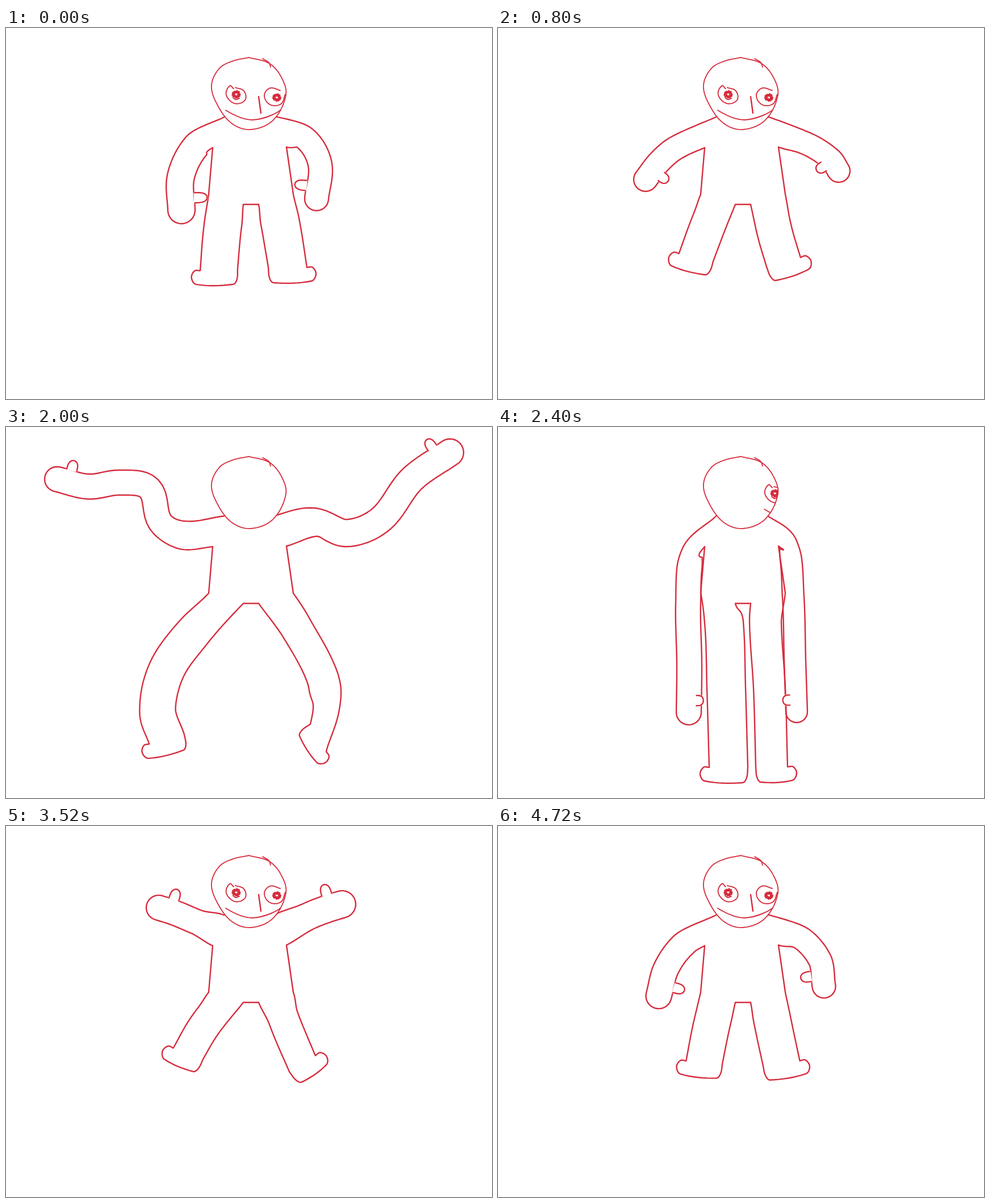
An HTML page with a canvas that plays this animation: 856 by 654 pixels, repeating every 4800 ms.

```html
<!DOCTYPE html>
<html lang="en">
<head>
<meta charset="utf-8">
<title>Dancing figure</title>
<style>
html, body { margin: 0; width: 100%; height: 100%; overflow: hidden; background: #fff; }
canvas { display: block; }
</style>
</head>
<body>
<canvas id="stage" width="856" height="654"></canvas>
<script>
const ctx = document.getElementById('stage').getContext('2d');
const INK = '#d62c3d', STEP = 80, STEPS = 60, N = 48;
const SIDES = [-1, 1];
const SHOULDERS = [[374, 185], [484, 184]], HIPS = [[388, 302], [475, 302]];

const lerp = (a, b, t) => a + (b - a) * t;
const lerpPoint = (a, b, t) => [lerp(a[0], b[0], t), lerp(a[1], b[1], t)];
const add = (p, v, k = 1) => [p[0] + v[0] * k, p[1] + v[1] * k];
const scale = (v, k) => [v[0] * k, v[1] * k];
const ramp = t => { t = Math.min(Math.max(t, 0), 1); return t * t * (3 - 2 * t); };
const points = text => text.split(' ').map(p => p.split(',').map(Number));
const unit = (a, b) => {
  const d = Math.hypot(b[0] - a[0], b[1] - a[1]) || 1;
  return [(b[0] - a[0]) / d, (b[1] - a[1]) / d];
};

// Unit direction of a polyline at point i.
const heading = (p, i) => unit(p[Math.max(i - 1, 0)], p[Math.min(i + 1, p.length - 1)]);

// Smooth curve through a few points, returned as n + 1 samples.
function smooth(p, n) {
  const last = p.length - 1, dirs = p.map((_, i) => heading(p, i));
  return Array.from({ length: n + 1 }, (_, j) => {
    const u = j / n * last, i = Math.min(Math.floor(u), last - 1), t = u - i;
    const a = p[i], b = p[i + 1], k = Math.hypot(b[0] - a[0], b[1] - a[1]) * t * (1 - t);
    const c = lerpPoint(a, b, ramp(t));
    return add(add(c, dirs[i], k * (1 - t)), dirs[i + 1], -k * t);
  });
}

// A limb is a centre line with a half width r; turn is the thumb side or the foot tilt.
const limb = (r, turn, text) => ({ r, turn, text });
const build = (limbs, roots) => limbs.map(({ r, turn, text }, i) =>
  ({ r, turn, spine: smooth([roots[i], ...points(text)], N) }));
const pose = (armL, armR, legL, legR) =>
  ({ arms: build([armL, armR], SHOULDERS), legs: build([legL, legR], HIPS) });

const down = pose(
  limb(24, 1, '335,208 308,262 309,321'), limb(21, 0.85, '526,194 553,240 547,301'),
  limb(33, -3, '380,365 375,426'), limb(34, 0, '486,360 496,422'));
const out = pose(
  limb(21, 0.45, '314,211 284,236 260,267'), limb(20, 0.45, '546,205 586,231 600,252'),
  limb(31, 12, '367,355 349,404'), limb(31, 16, '488,362 503,413'));
const up = pose(
  limb(22, -0.75, '333,168 297,153 269,144'), limb(24, -0.75, '535,158 566,146 592,138'),
  limb(28, 20, '347,356 321,401'), limb(27, 32, '496,358 522,419'));
const wide = pose(
  limb(25, 0.1, '330,153 250,133 185,138'), limb(19, -0.8, '545,147 615,131 692,121'),
  limb(30, 36, '333,374 286,432'), limb(30, 51, '520,381 569,451'));
const wave = pose(
  limb(22, -0.65, '312,191 272,168 252,108 200,98 145,105 90,92'),
  limb(24, -0.7, '545,168 600,187 660,163 715,92 782,45'),
  limb(32, -16, '330,362 283,428 267,500 283,550'), limb(28, -60, '510,352 556,438 563,492 550,548'));
const tall = pose(
  limb(22, 0.3, '343,220 335,310 337,420 336,503'), limb(19, 0.3, '510,205 520,300 523,410 526,502'),
  limb(34, 0, '398,345 402,460 406,600'), limb(28, 0, '471,345 478,460 482,599'));

// Swing a point about a shoulder: angle and reach change together.
function swing(a, b, t, [cx, cy]) {
  const a0 = Math.atan2(a[1] - cy, a[0] - cx), a1 = Math.atan2(b[1] - cy, b[0] - cx);
  const turn = Math.atan2(Math.sin(a1 - a0), Math.cos(a1 - a0));
  const r = lerp(Math.hypot(a[0] - cx, a[1] - cy), Math.hypot(b[0] - cx, b[1] - cy), t);
  return [cx + r * Math.cos(a0 + turn * t), cy + r * Math.sin(a0 + turn * t)];
}

function mix(a, b, t) {
  const blend = (key, move) => a[key].map((m, i) => {
    const n = b[key][i];
    return {
      r: lerp(m.r, n.r, t),
      turn: lerp(m.turn, n.turn, t),
      spine: m.spine.map((p, j) => move(p, n.spine[j], t, SHOULDERS[i]))
    };
  });
  return { arms: blend('arms', swing), legs: blend('legs', lerpPoint) };
}

function raise(a, deg) {
  const arms = a.arms.map((arm, i) => {
    const w = -SIDES[i] * deg * Math.PI / 180, [cx, cy] = SHOULDERS[i];
    const spine = arm.spine.map(([x, y]) => [
      cx + (x - cx) * Math.cos(w) - (y - cy) * Math.sin(w),
      cy + (x - cx) * Math.sin(w) + (y - cy) * Math.cos(w)]);
    return { ...arm, spine };
  });
  return { ...a, arms };
}

const flap = [down, mix(down, out, 0.45), out, mix(out, up, 0.5), up, raise(up, 6), raise(up, 12)];

// from step, to step, poses, easing power
const dance = [
  [14, 17, out, wide, 1],
  [17, 25, wide, wave, 1],
  [25, 30, wave, tall, 1.4],
  [30, 36, tall, down, 1.6]
];

function poseAt(step) {
  const part = dance.find(([from, to]) => step > from && step <= to);
  if (part) {
    const [from, to, a, b, power] = part;
    return mix(a, b, ((step - from) / (to - from)) ** power);
  }
  const phase = step % 12;
  return flap[Math.min(phase, 12 - phase)];
}

function faceShift(step) {
  if (step <= 14 || step >= 36) return 0;
  return step <= 25 ? -18.3 * (step - 14) : 13.7 * (36 - step);
}

// Unit vector from the centre line towards the body's middle.
function inward(spine, i, side) {
  const [dx, dy] = heading(spine, i);
  return [-side * dy, side * dx];
}

// One edge of a limb; its root and, if given, its end keep fixed offsets.
function edge({ spine, r }, side, sign, root, end) {
  return spine.map((p, i) => {
    const u = i / N, normal = scale(inward(spine, i, side), sign * r);
    const v = lerpPoint(root, normal, ramp(u / 0.33));
    return add(p, end ? lerpPoint(v, end, ramp((u - 0.6) / 0.4)) : v);
  });
}

function armLine(arm, side) {
  const tip = arm.spine[N], d = heading(arm.spine, N), n = inward(arm.spine, N, side);
  const cap = Array.from({ length: 17 }, (_, i) => {
    const a = Math.PI * i / 16;
    return add(add(tip, n, -arm.r * Math.cos(a)), d, arm.r * Math.sin(a));
  });
  return [
    ...edge(arm, side, -1, [-10 * side, -28]), ...cap,
    ...edge(arm, side, 1, [10 * side, 26]).reverse()
  ];
}

function thumbLine({ spine, r, turn }, side) {
  const d = heading(spine, N), n = inward(spine, N, side), sign = turn < 0 ? -1 : 1;
  const reach = Math.min(Math.max(2 * turn, -1), 1) * r, len = sign * (8 + 14 * Math.abs(turn));
  const base = add(add(spine[N], d, -21), n, reach);
  return Array.from({ length: 25 }, (_, i) => {
    const a = Math.PI * i / 24;
    return add(add(base, d, -9 * Math.cos(a)), n, len * Math.abs(Math.sin(a)) ** 0.6);
  });
}

// Armpit, outer leg, foot, inner leg, crotch.
function legLine(leg, side) {
  const { r, spine } = leg, a = leg.turn * Math.PI / 180, ankle = spine[N];
  const toe = [side * Math.cos(a), -Math.sin(a)], sole = [side * Math.sin(a), Math.cos(a)];
  const at = (x, y) => add(add(ankle, toe, x), sole, y);
  const foot = smooth([
    at(r, 0), at(r + 10, 0), at(r + 16, 12), at(r + 8, 24),
    at(9 - r, 27), at(2 - r, 18), at(-r, 0)], 48);
  const shoulder = SHOULDERS[side < 0 ? 0 : 1];
  return [
    add(shoulder, [10 * side, 26]),
    ...edge(leg, side, -1, [31 * side, -9], scale(toe, r)), ...foot,
    ...edge(leg, side, 1, [-30 * side, 9], scale(toe, -r)).reverse()
  ];
}

function trace(line) {
  const path = new Path2D();
  line.forEach(([x, y]) => path.lineTo(x, y));
  return path;
}

const curve = text => trace(smooth(points(text), 96));

function stroke(path, width, color = INK) {
  ctx.lineWidth = width;
  ctx.strokeStyle = color;
  ctx.stroke(path);
}

function fill(path) {
  ctx.fillStyle = '#fff';
  ctx.fill(path);
}

const scribble = (cx, cy) => trace(Array.from({ length: 50 }, (_, i) => {
  const r = 4.6 + 2.2 * Math.sin(i * 1.3);
  return [cx + r * 1.1 * Math.cos(i * 0.5), cy + r * Math.sin(i * 0.5)];
}));

const head = curve('428,52 463,62 484,85 493,118 470,163 430,179 396,167 370,131 362,100 376,71 400,58 428,52');
const tuft = curve('452,54 463,61 466,69');
const eyeL = curve('401,107 394,102 388,118 403,133 421,127 419,111 404,105');
const eyeR = curve('483,110 465,106 455,119 465,135 484,134 492,117');
const lidL = curve('400,123 405,126 411,124');
const pupilL = scribble(405.5, 117), pupilR = scribble(477, 122.5);
const nose = new Path2D('M445 121L449 150');
const mouth = new Path2D('M387 145C405 156 420 162 434 162C455 161 480 150 487 141');

function shifted(dx, width, paths) {
  ctx.save();
  ctx.translate(dx, 0);
  paths.forEach(p => stroke(p, width));
  ctx.restore();
}

function drawHead(dx) {
  fill(head);
  ctx.save();
  ctx.clip(head);
  shifted(dx < 0 ? dx * 0.67 : dx, 1.9, [eyeL, lidL, pupilL]);
  shifted(dx, 1.9, [eyeR, pupilR, mouth]);
  shifted(dx, 2.4, [nose]);
  ctx.restore();
  stroke(head, 1.8);
  stroke(tuft, 1.8);
}

function drawThumb(line) {
  const path = trace(line), patch = new Path2D(path);
  patch.closePath();
  fill(patch);
  stroke(patch, 3, '#fff');
  stroke(path, 2.4);
}

function draw(step) {
  const { arms, legs } = poseAt(step);
  ctx.fillStyle = '#fff';
  ctx.fillRect(0, 0, 856, 654);
  ctx.lineCap = ctx.lineJoin = 'round';
  const [left, right] = legs.map((leg, i) => legLine(leg, SIDES[i]));
  stroke(trace([...left, ...right.reverse()]), 2.4);
  arms.forEach((arm, i) => stroke(trace(armLine(arm, SIDES[i])), 2.4));
  arms.forEach((arm, i) => drawThumb(thumbLine(arm, SIDES[i])));
  drawHead(faceShift(step));
}

const start = performance.now();
let shown = -1;
function loop() {
  const step = Math.floor((performance.now() - start) / STEP) % STEPS;
  if (step !== shown) draw(shown = step);
  requestAnimationFrame(loop);
}
loop();
</script>
</body>
</html>
```
